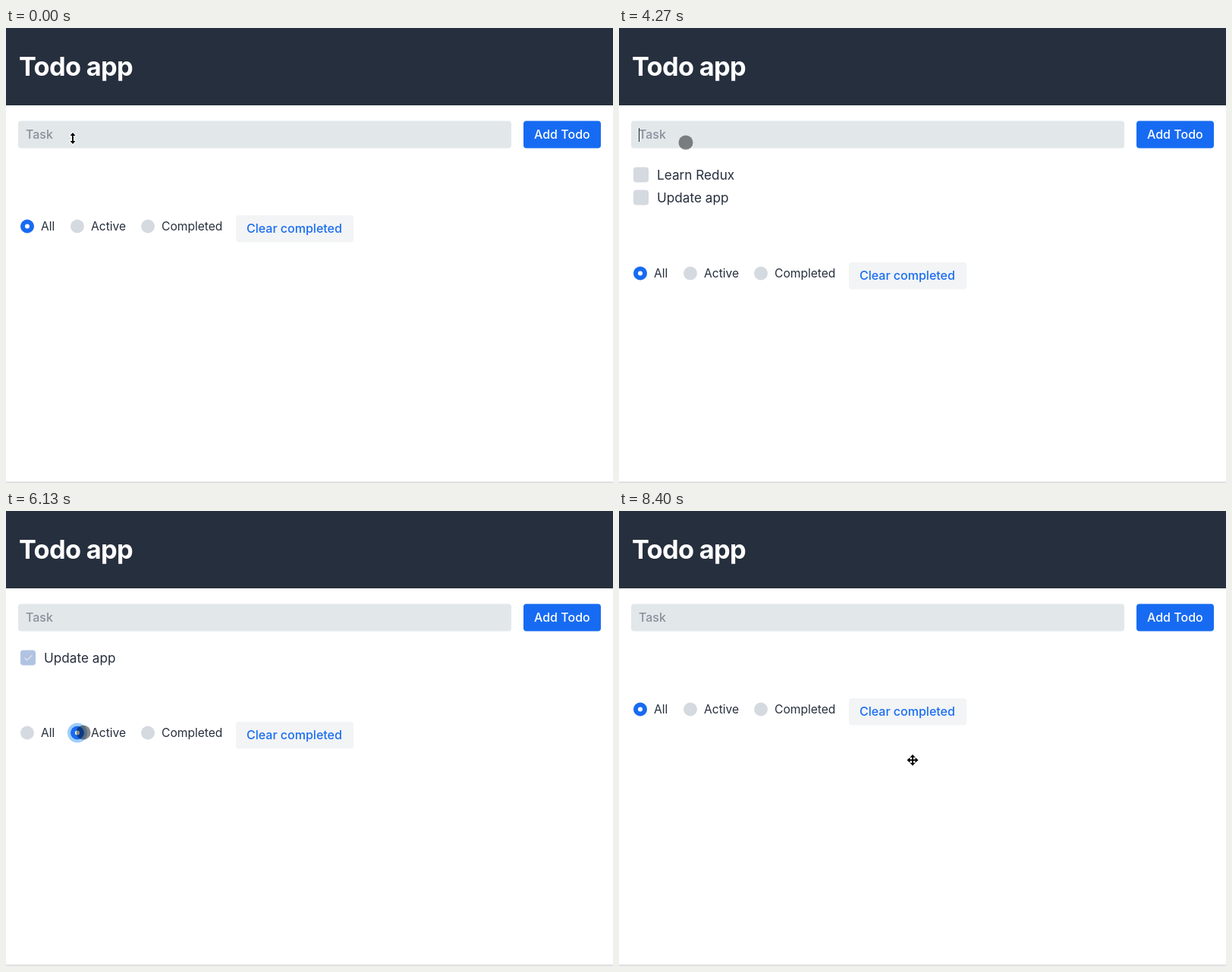
An HTML page for the animation above (8470 ms loop, 800 by 600 pixels).

```html
<!DOCTYPE html>
<html lang="en">
<head>
<meta charset="utf-8">
<title>Todo app</title>
<style>
  html, body { margin: 0; width: 100%; height: 100%; overflow: hidden; background: #fff; }
  svg { display: block; width: 800px; height: 600px; }
  text { font: 500 16px Inter, "Open Sans", sans-serif; fill: #262f3d; white-space: pre; }
  .title { font-size: 34.4px; font-weight: 700; letter-spacing: -.02em; fill: #fff; }
  .label { font-size: 17.2px; font-weight: 400; }
  .option { font-size: 15.6px; font-weight: 400; }
  .link { fill: #1a6df0; }
  .gray { fill: #d5d9e0; }
  .blue { fill: #176bf2; }
  .ring { fill: #9fcefb; }
  .halo { stroke: #fff; stroke-width: 2.5; stroke-linejoin: round; }
</style>
</head>
<body>
<svg viewBox="0 0 800 600">
  <rect width="800" height="600" fill="#fff"/>
  <rect width="800" height="102" fill="#262f3d"/>
  <rect y="598" width="800" height="2" fill="#e0e0e0"/>
  <text class="title" x="17" y="63">Todo app</text>
  <rect x="16" y="122.500" width="650" height="36" rx="4" fill="#e2e7ea"/>
  <text id="field" x="26" y="146"></text>
  <rect id="caret" y="132" width="1" height="18" fill="#20262f"/>
  <rect class="blue" x="682" y="122.500" width="102" height="36" rx="4"/>
  <text x="696" y="146" fill="#fff" style="fill:#fff">Add Todo</text>
  <g id="list"></g>
  <g id="bar">
    <g id="options"></g>
    <rect x="303" y="247" width="155" height="35.500" rx="4" fill="#f2f4f6"/>
    <text class="link" x="317" y="270">Clear completed</text>
  </g>
  <circle id="dot" r="9.500" fill="#000" fill-opacity=".46"/>
  <g id="vertical" transform="translate(88 145.500)"></g>
  <g id="cross" transform="translate(387 328.500)"></g>
</svg>
<script>
const LOOP = 8470, STEP = 200 / 3;
const $ = id => document.getElementById(id);
const clamp = v => Math.max(0, Math.min(1, v));
const show = (node, on) => node.setAttribute('visibility', on ? 'visible' : 'hidden');
const fade = (node, v) => node.setAttribute('opacity', v);
const within = (t, a, b) => t >= a && t < b;

function add(parent, markup) {
  const g = document.createElementNS('http://www.w3.org/2000/svg', 'g');
  g.innerHTML = markup;
  parent.append(g);
  return g;
}

const box = (cls, pad) =>
  `<rect class="${cls}" x="${19 - pad}" y="${183.5 - pad}" width="${20 + 2 * pad}" height="${20 + 2 * pad}" rx="${4 + pad / 2}"/>`;

const rows = [0, 30].map(y => {
  const g = add($('list'), box('ring', 4) + box('gray', 0) +
    `<g>${box('blue', 0)}<path d="M24.500 193.500l3.300 3.300 6.700-6.800" fill="none" stroke="#fff" stroke-width="1.500"/></g>` +
    '<text class="label" x="50" y="200"></text>');
  g.setAttribute('transform', `translate(0 ${y})`);
  const [ring, , tick, label] = g.children;
  return { g, ring, tick, label };
});

const radios = [['All', 28, 46], ['Active', 94, 112], ['Completed', 187, 205]].map(([name, x, tx]) => {
  const disc = (cls, r) => `<circle class="${cls}" cx="${x}" cy="261.500" r="${r}"/>`;
  const g = add($('options'), disc('ring', 13) + disc('gray', 9) +
    `<g>${disc('blue', 9)}<circle cx="${x}" cy="261.500" r="3" fill="#fff"/></g>` +
    `<text class="option" x="${tx}" y="267">${name}</text>`);
  return { ring: g.children[0], on: g.children[2] };
});

const arrow = 'M0-7.500l3.500 4h-2.600v3.500h-1.800v-3.500h-2.600z';
const arrows = turns => turns.map(a => `<path d="${arrow}" transform="rotate(${a})"/>`).join('');
const cursor = (id, turns, extra = '') => {
  const shape = arrows(turns) + extra;
  $(id).innerHTML = `<g class="halo" fill="#fff">${shape}</g>${shape}`;
};
cursor('vertical', [0, 180], '<path d="M-1-1h2v2h-2z"/>');
cursor('cross', [0, 90, 180, 270], '<path d="M-1-1h2v2h-2z"/>');

// [time, text in the field]
const typing = [
  [0, ''], [670, 'L'], [730, 'Le'], [800, 'Lea'], [930, 'Lear'], [1070, 'Learn'],
  [1400, 'Learn R'], [1530, 'Learn Re'], [1600, 'Learn Red'], [1800, 'Learn Redu'], [1930, 'Learn Redux'],
  [2130, ''], [2400, 'U'], [2530, 'Up'], [2670, 'Upd'], [2730, 'Upda'], [2870, 'Update'],
  [3130, 'Update '], [3270, 'Update a'], [3470, 'Update ap'], [3530, 'Update app'], [4270, '']
];
const caretOn = [[470, 1330], [1400, 4000], [4270, 4800]];
const path = [
  [3800, 88, 151], [4530, 88, 151], [4670, 68, 165], [4800, 33, 190], [4870, 29, 194], [5400, 29, 194],
  [5530, 40, 222], [5670, 72, 286], [5800, 93, 321], [6000, 94, 323], [6070, 100, 306], [6130, 102, 292],
  [6270, 102, 292], [6400, 66, 293], [6530, 30, 294], [7130, 28, 294], [7200, 28, 275], [7330, 29, 228],
  [7400, 29, 225], [7530, 29, 225], [7600, 110, 238], [7670, 265, 277], [7730, 358, 303], [7800, 377, 317],
  [7930, 386, 327], [8400, 387, 328]
];

function mouse(t) {
  const i = path.findIndex(p => p[0] > t);
  if (i < 1) return path[i < 0 ? path.length - 1 : 0].slice(1);
  const [a, b] = [path[i - 1], path[i]];
  const k = (t - a[0]) / (b[0] - a[0]);
  return [1, 2].map(c => a[c] + (b[c] - a[c]) * k);
}

// Press highlight: quick in, slow out
const press = (t, from, to) => t < from ? 0 : clamp((t - from + 70) / 110) * clamp(1 - (t - to) / 250);

const LEARN = 4930, ACTIVE = 6000, ALL = 6600, UPDATE = 7400, CLEAR = 8000;

function draw(t) {
  const text = typing.filter(k => k[0] <= t).pop()[1];
  const field = $('field');
  field.textContent = text || 'Task';
  field.style.fill = text ? '' : '#8a909b';
  const width = text ? field.getComputedTextLength() : 0;
  $('caret').setAttribute('x', Math.round(26 + width));
  show($('caret'), caretOn.some(([a, b]) => within(t, a, b)));

  const active = within(t, ACTIVE, ALL);
  let items = [];
  if (within(t, 2130, CLEAR) && !active) items.push('Learn Redux');
  if (within(t, 4270, CLEAR)) items.push('Update app');
  rows.forEach((row, i) => {
    show(row.g, i < items.length);
    row.label.textContent = items[i] || '';
  });
  $('bar').setAttribute('transform', `translate(0 ${items.length * 31})`);

  const first = active ? clamp(1 - (t - ACTIVE) / 160) : clamp((t - LEARN + 70) / 130);
  fade(rows[0].tick, first);
  fade(rows[1].tick, clamp((t - UPDATE + 70) / 130));
  fade(rows[0].ring, press(t, LEARN, 5070));
  fade(rows[1].ring, press(t, UPDATE, 7500));
  fade(radios[0].on, active ? 0 : 1);
  fade(radios[1].on, active ? 1 : 0);
  fade(radios[2].on, 0);
  fade(radios[0].ring, press(t, ALL, 6670));
  fade(radios[1].ring, active ? press(t, ACTIVE, 6130) : 0);
  fade(radios[2].ring, 0);

  const [x, y] = mouse(t);
  $('dot').setAttribute('cx', x);
  $('dot').setAttribute('cy', y);
  show($('dot'), within(t, 3800, 8330));
  show($('vertical'), t < 670);
  show($('cross'), t >= 8330);
}

function tick(now) {
  const t = now % LOOP;
  draw(Math.round(Math.floor((t + 4) / STEP) * STEP / 10) * 10);
  requestAnimationFrame(tick);
}
draw(0);
requestAnimationFrame(tick);
</script>
</body>
</html>
```
